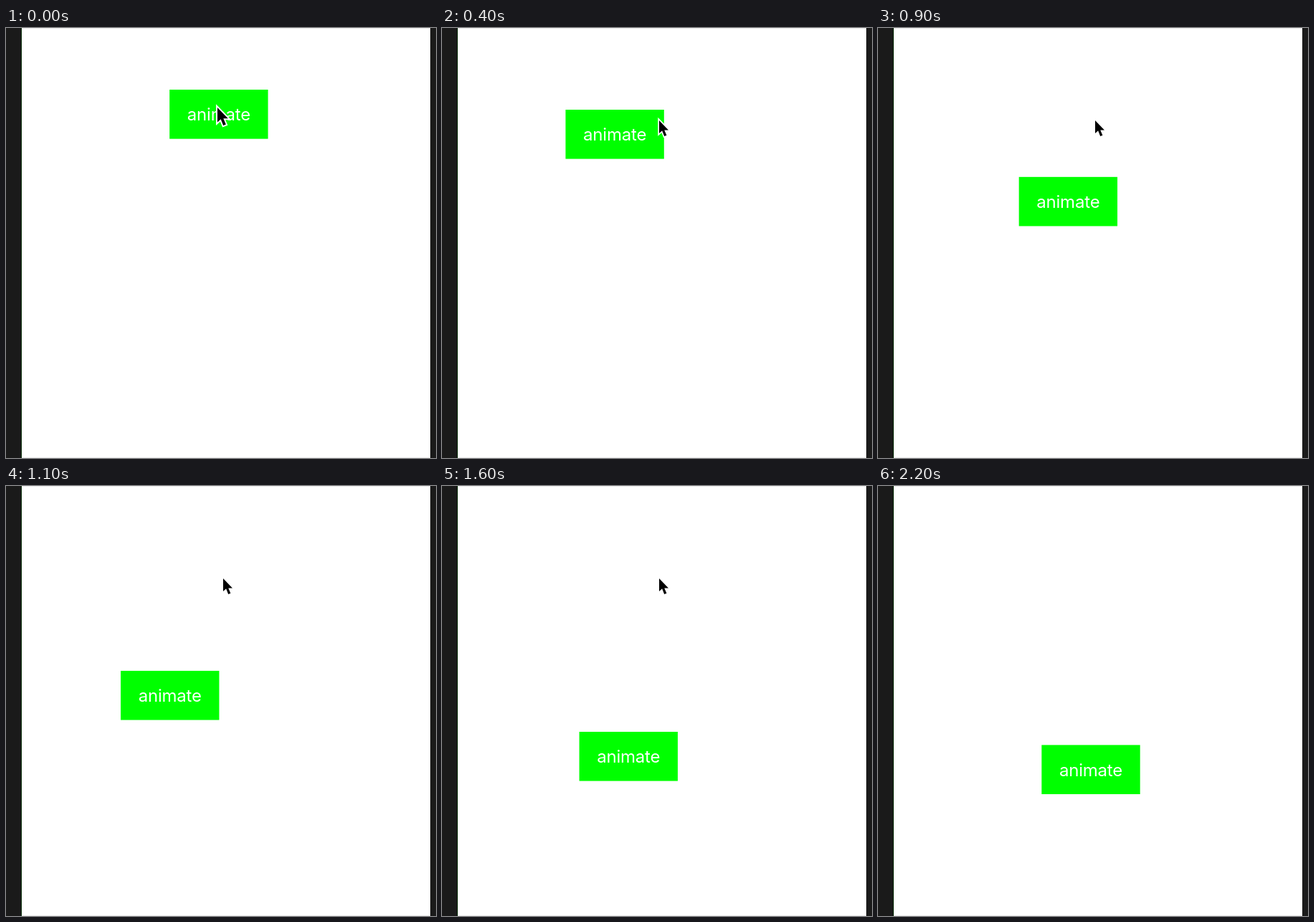
An HTML page for the animation above (2300 ms loop, 600 by 600 pixels).

```html
<!DOCTYPE html>
<html lang="en">
<head>
<meta charset="utf-8">
<title>Zigzag button</title>
<style>
  html, body { margin: 0; width: 100%; height: 100%; overflow: hidden; background: #fff; }
  svg { display: block; width: 600px; height: 600px; }
  text { font: 400 24px Inter, "Liberation Sans", sans-serif; letter-spacing: -.2px; fill: #fff; text-anchor: middle; }
</style>
</head>
<body>
<svg viewBox="0 0 600 600">
  <rect width="600" height="600" fill="#fff"/>
  <path d="M22 .5H592M22 599.5H592" stroke="#ececec"/>
  <path d="M0 0H22V600H0ZM592 0H600V600H592Z" fill="#1a1a1a"/>
  <path d="M21.5 0V600" stroke="#0b300b"/>
  <g id="button">
    <rect width="137.4" height="68.6" fill="#0f0"/>
    <text x="68.7" y="43.4">animate</text>
  </g>
  <g id="cursor">
    <path id="arrow" d="M0 0V18L4.1 14.3L7.2 22L10.4 20.7L7.3 13.4H13Z"
      fill="#000" stroke="#fff" stroke-width="3.4" paint-order="stroke"/>
  </g>
</svg>
<script>
const LOOP = 2300, STEP = 100, DURATION = 2000;
const LEFT = 228.3, TOP = 86, SWING = 137.4, DROP = 68.85;
const button = document.getElementById('button');
const cursor = document.getElementById('cursor');

const CLOCK = [[0, 20], [400, 445], [700, 720], [1100, 1146], [1400, 1424], [1800, 1850], [2300, 2350]];
// Time, pointer x, y, scale
const POINTER = [[0, 295, 111, 1.14], [100, 297.5, 117, 1.08], [200, 301, 125, 1], [400, 303, 129, 1], [2300, 303, 129, 1]];
const POINTER_GONE = 2100;

function sample(keys, t) {
  const i = Math.max(1, keys.findIndex(k => k[0] >= t));
  const a = keys[i - 1], b = keys[i];
  const f = (t - a[0]) / (b[0] - a[0]);
  return a.slice(1).map((v, n) => v + (b[n + 1] - v) * f);
}

// cubic-bezier(.42, 0, .58, 1)
function easeInOut(x) {
  if (x >= 1) return 1;
  let lo = 0, hi = 1;
  for (let i = 0; i < 24; i++) {
    const s = (lo + hi) / 2;
    if (1.26 * s - .78 * s * s + .52 * s ** 3 < x) lo = s; else hi = s;
  }
  return 3 * lo * lo - 2 * lo ** 3;
}

function draw(time) {
  const t = Math.floor((time % LOOP) / STEP) * STEP;
  const travel = 4 * easeInOut(sample(CLOCK, t)[0] / DURATION);
  const swing = 1 - Math.abs(travel % 2 - 1);
  button.setAttribute('transform', `translate(${LEFT - SWING * swing} ${TOP + DROP * travel})`);

  const [x, y, scale] = sample(POINTER, t);
  cursor.setAttribute('transform', `translate(${x} ${y}) scale(${scale})`);
  cursor.setAttribute('visibility', t < POINTER_GONE ? 'visible' : 'hidden');
}

const start = performance.now();
function tick() {
  draw(performance.now() - start);
  requestAnimationFrame(tick);
}
tick();
</script>
</body>
</html>
```
